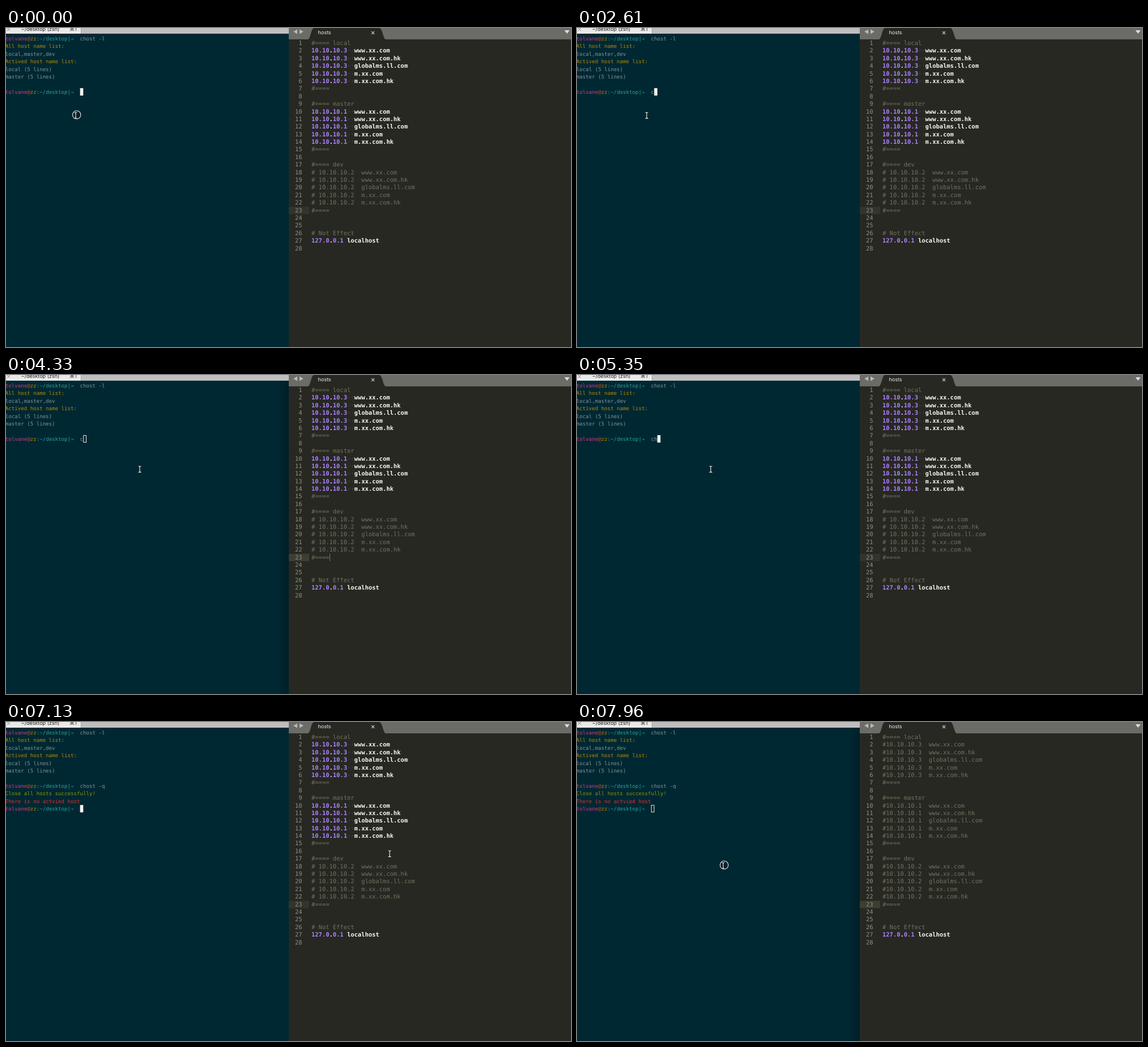
Write an HTML page that moves like this. It is 997 px wide and 562 px high and loops after 8000 ms.

```html
<!DOCTYPE html>
<html lang="en">
<head>
<meta charset="utf-8">
<title>Switching hosts</title>
<style>
html, body { margin: 0; width: 100%; height: 100%; overflow: hidden; background: #002833; }
svg { display: block; }
text { white-space: pre; text-rendering: geometricPrecision; }
.term { font: 9.14px "DejaVu Sans Mono", monospace; }
.code { font: 10.46px "DejaVu Sans Mono", monospace; }
.ui { font: 9.6px Inter, sans-serif; }
</style>
</head>
<body>
<svg id="stage" width="997" height="562" viewBox="0 0 997 562"></svg>
<script>
const LOOP = 8000;
const stage = document.getElementById('stage');
const C = {
  grey: '#839496', yellow: '#b58900', cyan: '#2aa198', pink: '#d33682', orange: '#cb4b16',
  green: '#859900', red: '#dc322f', comment: '#75715e', purple: '#ae81ff', white: '#f8f8f2'
};

// Each step changes only the listed parts of the state.
const START = { x: 123, y: 154, shape: 'beam', click: true, typed: '', stage: 'typing', editor: false, caret: false, closed: false };
const STEPS = [
  [0, {}],
  [150, { click: false }],
  [2610, { typed: 'c' }],
  [3350, { x: 430, y: 196 }],
  [3500, { x: 624, y: 215 }],
  [3800, { click: true }],
  [3950, { editor: true, caret: true }],
  [4130, { x: 420, y: 190, click: false }],
  [4330, { x: 236, y: 166 }],
  [4540, { click: true }],
  [4720, { click: false, editor: false, caret: false }],
  [5350, { typed: 'ch' }],
  [5500, { typed: 'cho' }],
  [5650, { typed: 'chost' }],
  [5800, { typed: 'chost -' }],
  [5950, { typed: 'chost -q' }],
  [6390, { stage: 'running' }],
  [6540, { x: 545, y: 162, shape: 'arrow' }],
  [6690, { x: 640, y: 212, shape: 'beam' }],
  [6840, { stage: 'done' }],
  [6980, { x: 677, y: 232 }],
  [7130, {}],
  [7300, { click: true, editor: true, closed: true }],
  [7480, { click: false }],
  [7640, { x: 470, y: 242 }],
  [7800, { x: 258, y: 253 }],
  [7960, { click: true }]
];

const rect = (x, y, w, h, fill, more = '') =>
  `<rect x="${x}" y="${y}" width="${w}" height="${h}" fill="${fill}" ${more}/>`;
const path = (d, fill, more = '') => `<path d="${d}" fill="${fill}" ${more}/>`;
const text = (cls, x, y, body, fill, more = '') =>
  `<text class="${cls}" x="${x}" y="${y}" fill="${fill}" ${more}>${body}</text>`;
const span = (body, fill) => `<tspan fill="${fill}">${body}</tspan>`;

const TERM_X = -1.3, TERM_W = 5.5;
const termY = row => 22 + 13.4 * row;
const codeY = row => 30 + 13.39 * row;

const prompt = command => span('tolvane', C.pink) + span('@', C.orange) + span('zz', C.yellow) +
  span(':~/desktop|⇒', C.cyan) + '  ' + command;

function terminal(s) {
  const lines = [
    prompt('chost -l'),
    span('All host name list:', C.yellow),
    'local,master,dev',
    span('Actived host name list:', C.yellow),
    'local (5 lines)',
    'master (5 lines)',
    '',
    prompt(s.typed)
  ];
  let row = 7, col = 24 + s.typed.length;
  if (s.stage === 'running') [row, col] = [8, 0];
  if (s.stage === 'done') {
    lines.push(span('Close all hosts successfully!', C.green), span('There is no actvied host', C.red), prompt(''));
    [row, col] = [10, 24];
  }
  const x = TERM_X + col * TERM_W, y = termY(row) - 9.8;
  const cursor = s.editor
    ? rect(x + .5, y + .5, 4.8, 12, 'none', 'stroke="#eee8d5"')
    : rect(x, y, 5.6, 13, '#f4f4ee');
  const title = s.stage === 'running' ? 'chost (zsh)' : '~/desktop (zsh)';
  return rect(0, 0, 499, 562, '#002833') +
    (s.editor ? rect(483, 10, 16, 552, 'url(#shade)') : '') +
    rect(0, 0, 499, 10, '#bebebe') + rect(0, 0, 132, 10, '#e9e9e9') + rect(132, 0, 1, 10, '#a4a4a4') +
    path('M2 5L7 0M2 0L7 5', 'none', 'stroke="#777" stroke-width=".9"') +
    text('ui', 60.5, 5, title, '#222', 'text-anchor="middle" style="font-size:9px"') +
    text('ui', 112, 5, '⌘1', '#333', 'style="font-family:Inter,\'DejaVu Sans\',sans-serif;font-size:9px"') +
    lines.map((line, i) => text('term', TERM_X, termY(i), line, C.grey)).join('') + cursor;
}

function hosts(closed) {
  const names = ['www.xx.com', 'www.xx.com.hk', 'globalms.ll.com', 'm.xx.com', 'm.xx.com.hk'];
  const address = (a, b) => span(a, C.purple) + '.' + span(b, C.purple);
  const note = body => ({ body, fill: C.comment });
  const group = (title, last, active) => [
    note('#==== ' + title),
    ...names.map(name => {
      if (closed) return note(`#10.10.10.${last}  ${name}`);
      if (!active) return note(`# 10.10.10.${last}  ${name}`);
      return { body: address('10.10', '10.' + last) + span('··', '#45463c') + name, fill: C.white, bold: true };
    }),
    note('#====')
  ];
  const blank = note('');
  return [
    ...group('local', 3, true), blank,
    ...group('master', 1, true), blank,
    ...group('dev', 2, false), blank, blank,
    note('# Not Effect'),
    { body: address('127.0', '0.1') + ' localhost', fill: C.white, bold: true },
    blank
  ];
}

function editor(s) {
  const rows = hosts(s.closed).map((line, i) =>
    text('code', 522.5, codeY(i), i + 1, '#8f908a', 'text-anchor="end"') +
    text('code', 539, codeY(i), line.body, line.fill, line.bold ? 'font-weight="bold" style="font-weight:bold"' : ''));
  return rect(499, 0, 498, 562, '#272822') +
    rect(499, 0, 498, 20, '#6b6c67') +
    path('M533 20C538 18 538 0 544 0H659C665 2 665 18 670 20Z', '#272822') +
    path('M507 6.5L514 2.5V10.5ZM525 6.5L518 2.5V10.5Z', '#b9bab5') +
    path('M985.5 4H994.5L990 10Z', '#dededb') +
    text('ui', 550.5, 11.2, 'hosts', '#f0f0ea', 'style="font-size:9px"') +
    path('M645 6L650 11M650 6L645 11', 'none', 'stroke="#c9c9c4" stroke-width="1.1"') +
    rect(499, 315, 36, 13, s.editor ? '#3e3d32' : '#33342c') +
    rows.join('') +
    (s.caret ? rect(571, 315, 1, 13, '#76776d') : '');
}

function pointer(s) {
  const beam = 'M-2.5 -5.5Q0 -5.5 0 -3.5Q0 -5.5 2.5 -5.5M0 -4V4M-2.5 5.5Q0 5.5 0 3.5Q0 5.5 2.5 5.5';
  const arrow = 'M0 0V11L2.6 8.6L4.4 12.6L6.2 11.8L4.5 8H8Z';
  const shape = s.shape === 'arrow'
    ? path(arrow, '#000', 'stroke="#fff" stroke-width=".9"')
    : path(beam, 'none', 'stroke="#111" stroke-width="2.2"') + path(beam, 'none', 'stroke="#fff" stroke-width="1.1"');
  const ring = s.click ? '<circle cx="1.7" cy="-1" r="7.2" fill="#000" fill-opacity=".2" stroke="#e8eeee" stroke-width="1.1"/>' : '';
  return `<g transform="translate(${s.x} ${s.y})">${ring}${shape}</g>`;
}

const defs = '<defs><linearGradient id="shade"><stop stop-opacity=".06"/><stop offset="1" stop-opacity=".22"/></linearGradient></defs>';

let shown = 0;
function draw(now) {
  const t = now % LOOP;
  const passed = STEPS.filter(([at]) => at <= t);
  if (passed.length !== shown) {
    shown = passed.length;
    const s = Object.assign({}, START, ...passed.map(step => step[1]));
    stage.innerHTML = defs + terminal(s) + editor(s) + pointer(s);
  }
  requestAnimationFrame(draw);
}
draw(performance.now());
</script>
</body>
</html>
```
